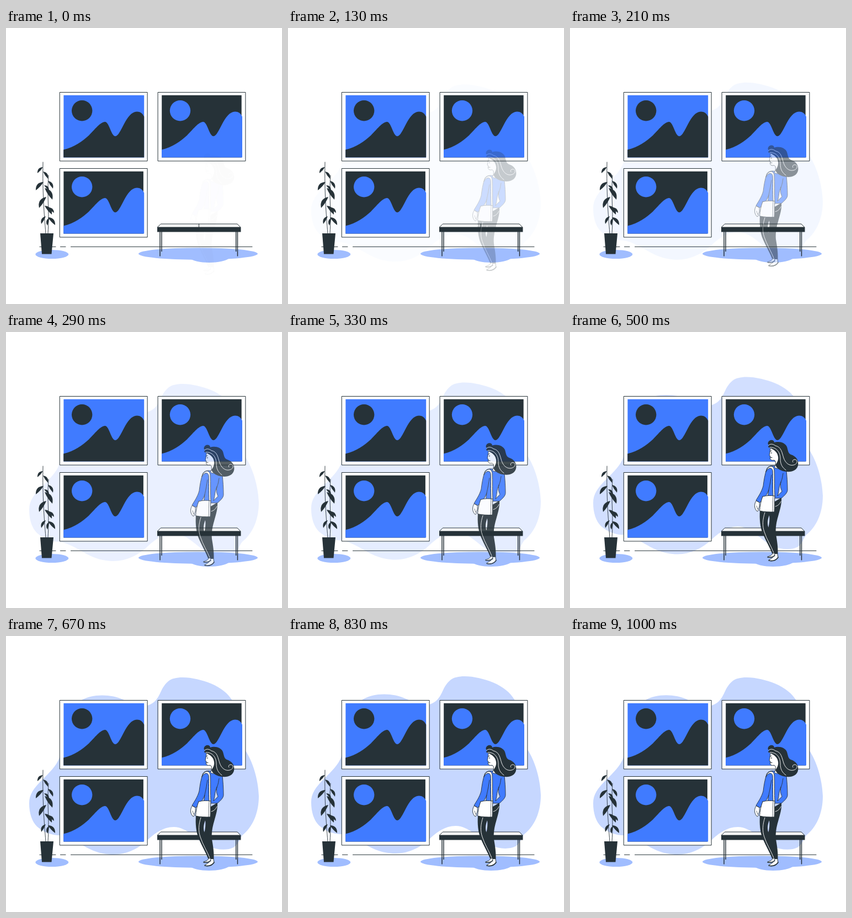
These frames come from a looping animation (500 by 500 pixels, 1.04 s). An HTML page:

```html
<!DOCTYPE html>
<html lang="en">
<head>
<meta charset="utf-8">
<title>Gallery visit</title>
<style>
  html, body { margin: 0; width: 100%; height: 100%; overflow: hidden; background: #fff; }
  svg { display: block; width: 100vw; height: 100vh; }
  .dark { fill: #263238; }
  .blue { fill: #407bff; }
  .white { fill: #fff; }
  .shade { fill: #a0bdff; }
  .ink { stroke: #263238; stroke-linecap: round; stroke-linejoin: round; }
  .chalk { stroke: #fff; stroke-width: .9; stroke-linecap: round; }
  .line { fill: none; }
</style>
</head>
<body>
<svg viewBox="0 0 500 500">
  <defs>
    <path id="hills" d="M0 99C20 94 34 84 46 73C56 63 67 48.500 75 48.500C83 48.500 86 74.500 94 74.500C104 74.500 113 30 133 30C139 30 143 33 146 39V113H0Z"/>
  </defs>

  <path id="blob" fill="#c6d7ff" d="M42 303C42 287 50 276 65 261C79 247 91 236 97 220C107 194 100 138 137 116C155 105 190 104 214 116C229 122 244 131 259 125C281 116 277 96 294 82C309 69 347 76 371 86C390 94 402 104 410 117C424 143 418 182 434 208C446 226 457 258 458 290C458 322 446 347 428 361C422 368 421 378 412 383C400 389 382 388 365 380C345 370 328 346 304 346C284 346 269 358 256 370C241 384 219 396 195 396C169 396 151 386 137 378C121 369 110 363 97 361C82 361 67 355 56 345C47 336 42 321 42 303Z"/>

  <g class="shade">
    <ellipse cx="83.300" cy="410" rx="30" ry="8"/>
    <ellipse cx="348" cy="409" rx="108" ry="10.800"/>
    <path d="M332 416C342 428 393 428 406 416Z"/>
  </g>
  <path class="ink line" d="M61 396.300H90M98.500 396.300H108M117.500 396.300H446" stroke-width="1"/>

  <g id="pictures"></g>

  <g class="dark">
    <path class="ink line" stroke-width=".9" d="M72 372C69 335 66 300 67 243M76 372C79 330 74 310 77 267"/>
    <g id="leaves"></g>
    <path d="M62 372H86L82.500 409.500H65Z"/>
  </g>

  <g class="ink">
    <path class="line" stroke-width="1.500" d="M279 368V413.500M282 368V405M419.500 368V413.500M416.700 368V405" stroke-linecap="butt"/>
    <path class="white" stroke-width="1" d="M281 355H419L425 361H274.500Z"/>
    <path class="line" stroke-width="1" d="M349.500 355V361"/>
  </g>
  <path class="dark" d="M274 361H425.500V369.500H274Z"/>

  <g id="visitor">
    <!-- legs -->
    <path class="dark" fill-rule="evenodd" d="M344 325L383 302C384 313 380 325 377 336C374 346 372 357 373 368C375 380 377 391 376.500 404L366.500 404C362 392 355 381 350 369C344 356 343 340 344 325ZM361 334C358 341 357 349 359.500 356C361 349 362 341 361 334Z"/>
    <path class="chalk line" d="M353 329C349 341 348 353 352 364C356 377 365 391 369.500 403M372 318C376 317 380 314 382 309"/>
    <!-- shoes -->
    <g class="white ink" stroke-width="1">
      <path d="M367 403C366 407 361 408 358 409C358 411 367 411 371 407L371 403Z"/>
      <path d="M371 404C370 410 365 412 360 415C361 418 372 418 377 411L376 404Z"/>
    </g>
    <path class="ink line" stroke-width="1.500" d="M358 410Q366 411 371 407M360 416Q372 418 377 410"/>
    <!-- jacket -->
    <g class="blue ink" stroke-width=".9">
      <path fill-rule="evenodd" d="M372 245C365 243 358 245 356 251C353 260 351 272 350 281C347 292 341 300 337 307L343.500 311C351 305 357 297 360 288L358 303H383C389 298 394 293 394 288C394 276 393 263 392 253C388 246 380 245 372 245ZM382 274C380 284 383 287 384 291C381 294 378 296 376 299C379 289 378 282 382 274Z"/>
      <path class="line" d="M360 288C362 278 364 269 365 261M382 274C385 268 385 262 386 258"/>
    </g>
    <!-- hand -->
    <path class="white ink" stroke-width=".9" d="M337 308C334 313 333 320 338 326C340 328 342 326 341 322C344 319 343 314 343 311Z"/>
    <path class="ink line" stroke-width=".7" d="M338 317L340 323"/>
    <!-- bag -->
    <g class="white ink" stroke-width="1">
      <path d="M355 255C358 243 369 242 370 252C371 268 370 284 371 301L368 301C367 281 368 264 367 253C366 247 359 247 355 255Z"/>
      <path d="M349 300C356 298 364 298 371 299C370 310 371 319 370 328C361 328 352 328 343.500 326C344 317 346 308 349 300Z"/>
      <path class="line" d="M368 299C367 309 368 319 367 328" stroke-width=".7"/>
    </g>
    <!-- head -->
    <path class="white ink" stroke-width=".9" d="M364 210C362 214 363 219 361 225.500L363 227L362.500 231C363 234 366 235 370 234L372 236C373 241 372 245 370 247C375 251 381 249 383 244L381 219Z"/>
    <path class="ink line" stroke-width="1" d="M362.500 218L365 217M365 220V222M363 229.500H366"/>
    <path class="dark" d="M370 202C378 199 390 202 393 210C395 216 395 222 400 224C410 227 415 235 413 244C411 252 403 256 392 255C382 254 375 250 372 243C375 239 378 234 377 228C376 220 370 215 362 212C358 211 359 208 361 207C357 206 358 200 363 198C367 197 370 199 370 202Z"/>
    <path class="chalk line" d="M360 207C364 203 370 206 372 208C383 210 384 221 387 230C390 239 397 245 405 243C413 241 413 233 407 233C404 233 402 236 404 238M362 211C374 210 381 220 381 231C381 241 384 247 391 252"/>
  </g>
</svg>
<script>
  const LOOP = 1040, STEPS = 25;
  const get = id => document.getElementById(id);

  // Framed landscapes: x, y, sky class, hill class, sun class
  const pictures = [
    [97.7, 116.5, 'blue', 'dark', 'dark'],
    [275.5, 116.5, 'dark', 'blue', 'blue'],
    [97.7, 254.5, 'dark', 'blue', 'blue']
  ];
  get('pictures').innerHTML = pictures.map(([x, y, sky, hill, sun], i) => `
    <g transform="translate(${x} ${y})">
      <rect class="white ink" width="158.400" height="124.500" stroke-width="1"/>
      <rect class="${sky}" x="6.700" y="5.300" width="${i ? 144.5 : 145.8}" height="112.800"/>
      <use href="#hills" class="${hill}" x="6.500" y="5.100"/>
      <circle class="${sun}" cx="40" cy="33.300" r="18.700"/>
    </g>`).join('');

  // Leaves: base x, base y, tip x, tip y
  const leaves = [
    [67, 252, 57, 263], [67, 260, 76, 273], [68, 279, 54, 294],
    [69, 285, 78, 294], [76, 277, 85, 291], [70, 290, 84, 311],
    [73, 306, 60, 326], [70, 322, 83, 338], [76, 325, 87, 335],
    [72, 341, 64, 355], [76, 343, 89, 357], [78, 344, 75, 358]
  ];
  const leaf = ([x, y, u, v]) => {
    const w = u - x, h = v - y, side = Math.sign(w);
    const bend = k => `${x + w / 2 + side * h * k} ${y + h / 2 - side * w * k}`;
    return `<path d="M${x} ${y}Q${bend(.5)} ${u} ${v}Q${bend(-.1)} ${x} ${y}Z"/>`;
  };
  get('leaves').innerHTML = leaves.map(leaf).join('');

  const bez = (a, b, s) => 3 * (1 - s) ** 2 * s * a + 3 * (1 - s) * s * s * b + s ** 3;

  // cubic-bezier(.36, -.01, .5, 1.38)
  function spring(x) {
    if (x >= 1) return 1;
    let lo = 0, hi = 1;
    for (let i = 0; i < 24; i++) {
      const mid = (lo + hi) / 2;
      if (bez(.36, .5, mid) < x) lo = mid; else hi = mid;
    }
    return bez(-.01, 1.38, lo);
  }

  function slideUp(el, x) {
    const p = spring(x);
    el.setAttribute('transform', `translate(0 ${30 * (1 - p)})`);
    el.style.opacity = Math.max(0, Math.min(1, p));
  }

  const blob = get('blob'), visitor = get('visitor');
  const start = performance.now();

  function draw(now) {
    const t = Math.max(0, now - start) % LOOP;
    const step = Math.min(STEPS, Math.floor((t + 2) * STEPS / LOOP) + 1);
    slideUp(blob, step / STEPS);
    slideUp(visitor, step / 15.5);
    requestAnimationFrame(draw);
  }
  draw(start);
</script>
</body>
</html>
```
